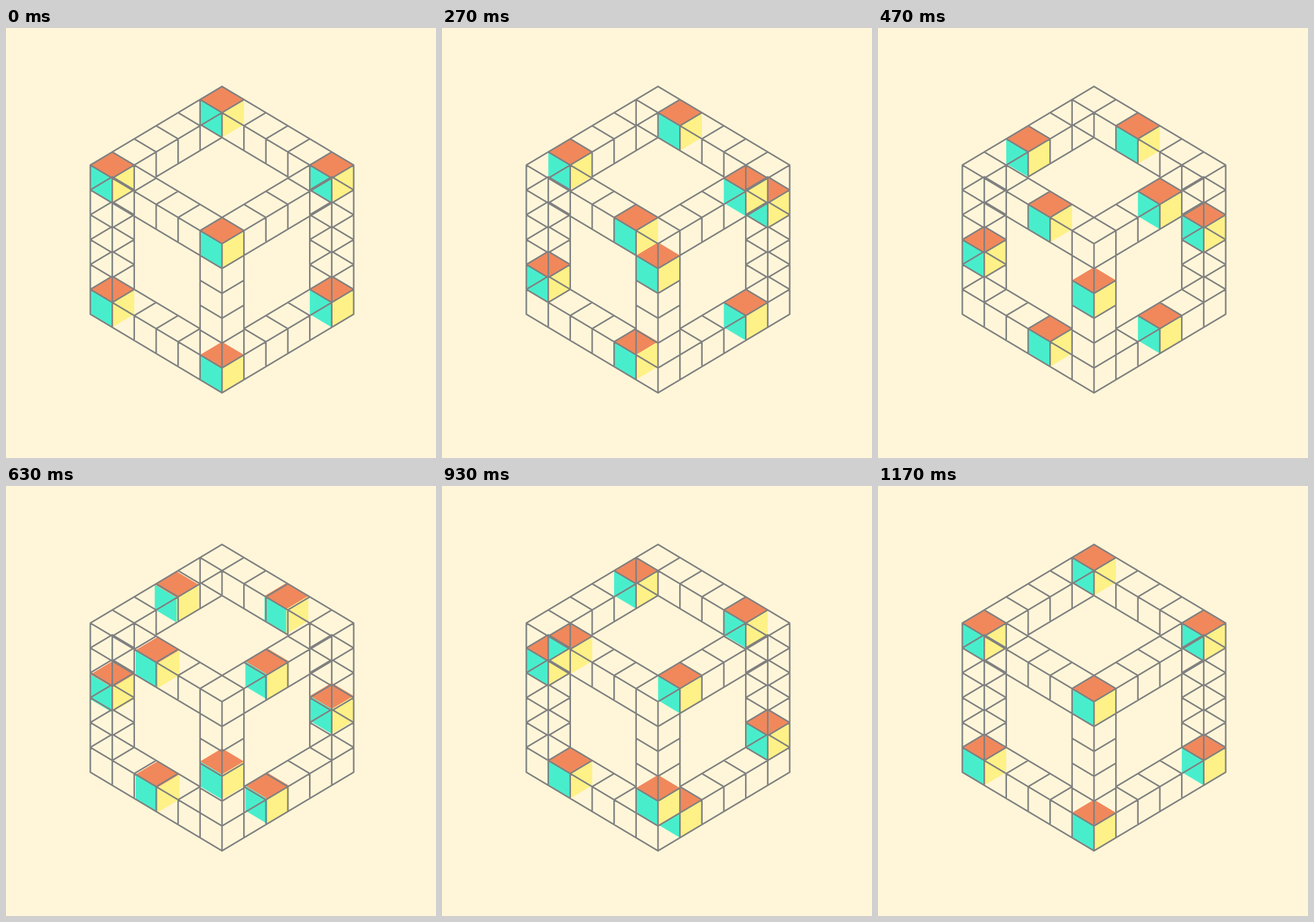
Recreate the animation shown at these times as an HTML page with a canvas. Size 640 by 640 pixels, loop 1.21 s.

```html
<!DOCTYPE html>
<html lang="en">
<head>
<meta charset="utf-8">
<title>Cube lattice</title>
<style>
  html, body { margin: 0; width: 100%; height: 100%; overflow: hidden; background: #fff6d9; }
  canvas { display: block; }
</style>
</head>
<body>
<canvas id="stage" width="640" height="640"></canvas>
<script>
const ctx = document.getElementById('stage').getContext('2d');

// Lattice axes: i runs right-down, j left-down, k straight down.
const project = ([i, j, k]) => [321.5 + 196 / 6 * (i - j), 87 + 19.5 * (i + j) + 37 * k];

// Polylines through lattice points, three digits "ijk" per point.
const lines = [
  '000 600 606 666 066 060 000',
  '610 110 160', '060 660 600', '150 550 510',
  '411 111 141', '161 561', '611 651', '010 011 111',
  '150 155', '160 166', '510 515', '610 616', '560 566', '660 666', '650 656',
  '155 455', '515 545', '065 665 605'
];
const repeat = (count, ...patterns) => {
  for (let n = 1; n <= count; n++)
    for (const p of patterns) lines.push(p.replaceAll('n', n));
};
repeat(5, 'n00 n10', '0n0 1n0', 'n50 n60', '5n0 6n0', 'n65 n66', '6n5 6n6',
  '06n 16n 15n 05n 06n', '60n 61n 51n 50n 60n', '56n 66n 65n');
repeat(4, 'n10 n11', '1n0 1n1', 'n60 n61', '6n0 6n1', 'n55 n65', '5n5 6n5');

const wire = new Path2D();
for (const line of lines)
  line.split(' ').forEach((p, n) => wire[n ? 'lineTo' : 'moveTo'](...project([...p].map(Number))));

// Each cube travels between two corner cells.
const tracks = ['050 000', '000 500', '550 050', '500 550', '055 050',
  '500 505', '550 555', '555 055', '505 555']
  .map(t => t.split(' ').map(p => [...p].map(Number)));

const faces = [
  ['#f0885c', '000 100 110 010'],
  ['#48eecc', '010 110 111 011'],
  ['#fdf187', '110 100 101 111']
].map(([color, pts]) => [color, pts.split(' ').map(p => [...p].map(Number))]);

// Length of each of the 30 poses, in units of 10 ms.
const holds = [...'344444463434643344444464334644'].map(d => d * 10);
const LOOP = 1210, POSES_PER_MOVE = 6;

function poseAt(time) {
  let pose = 0;
  while (time >= holds[pose]) time -= holds[pose++];
  return pose;
}

const easeInOutQuint = t => t < 0.5 ? 16 * t ** 5 : 1 - 16 * (1 - t) ** 5;

function draw(now) {
  const step = poseAt(now % LOOP) / POSES_PER_MOVE;
  const whole = Math.floor(step);
  const progress = (whole + easeInOutQuint(step - whole)) / 5;
  const cells = tracks.map(([from, to]) => from.map((v, a) => v + (to[a] - v) * progress));

  ctx.fillStyle = '#fff6d9';
  ctx.fillRect(0, 0, 640, 640);
  for (const [color, corners] of faces) {
    ctx.fillStyle = color;
    for (const cell of cells) {
      ctx.beginPath();
      for (const c of corners) ctx.lineTo(...project(c.map((v, a) => v + cell[a])));
      ctx.fill();
    }
  }
  ctx.strokeStyle = '#808080';
  ctx.lineWidth = 2.3;
  ctx.lineJoin = ctx.lineCap = 'round';
  ctx.stroke(wire);
}

const start = performance.now();
function tick() {
  draw(performance.now() - start);
  requestAnimationFrame(tick);
}
tick();
</script>
</body>
</html>
```
